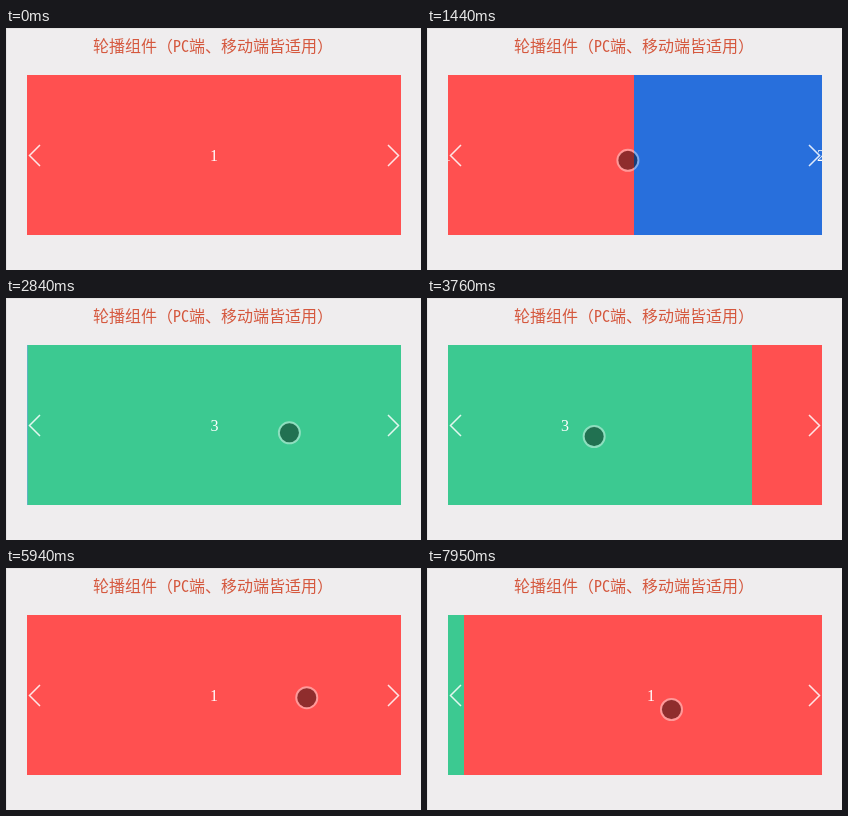
An HTML page for the animation above (8000 ms loop, 415x242 px).

```html
<!DOCTYPE html>
<html lang="zh">
<head>
<meta charset="utf-8">
<title>轮播组件</title>
<style>
  html, body { margin: 0; width: 100%; height: 100%; overflow: hidden; background: #efedee; }
  svg { display: block; width: 100%; height: 100%; }
  .title { font: 300 16px "Noto Sans Mono CJK SC", "Noto Sans CJK SC", "Noto Sans CJK", monospace; fill: #d5583e; }
  .digit { font: 16px "Liberation Serif", serif; fill: #fff; text-anchor: middle; }
  .arrow { fill: none; stroke: #fff; stroke-opacity: .85; stroke-width: 1.5; }
</style>
</head>
<body>
<svg viewBox="0 0 415 242">
  <defs><clipPath id="view"><rect x="21" y="47" width="374" height="160"/></clipPath></defs>
  <rect width="415" height="242" fill="#efedee"/>
  <path d="M0 .5H415M.5 0V242" stroke="#e5e3e4"/>
  <text class="title" x="87" y="24">轮播组件（PC<tspan x="183">端、移动端皆适用）</tspan></text>
  <g clip-path="url(#view)" id="slides"></g>
  <path class="arrow" d="M34 117L23.5 127.5L34 138M382 117L392.5 127.5L382 138"/>
  <g id="touch">
    <circle r="9.7" fill="#000" fill-opacity=".44"/>
    <circle r="10.5" fill="none" stroke="#fff" stroke-opacity=".42" stroke-width="2"/>
  </g>
</svg>
<script>
const LOOP = 8000, APPEAR = 70, WIDTH = 374, SETTLE = 300, SLOP = 6;
const COLORS = ['#ff5050', '#286fdc', '#3cc991'];

// The pointer arrives at `from` (curving towards `via`), is pressed at `down`,
// drags to `to` until `stop`, lets go at `up` and turns `turn` pages.
// Without `to` it only pauses there. It moves on at `leave`.
const gestures = [
  { arrive: 0, leave: APPEAR, from: [352, 226] },
  { arrive: 350, leave: 450, from: [385, 103] },
  { arrive: 900, down: 1060, up: 1520, from: [388.5, 134], to: [162, 132], via: [345, 118], turn: 1 },
  { arrive: 1900, down: 1910, up: 2560, from: [253.5, 131.5], to: [143, 131.5], turn: 1 },
  { arrive: 3380, down: 3530, up: 3860, from: [237.5, 138.5], to: [137, 138.5], via: [430, 137], turn: 1 },
  { arrive: 4380, down: 4640, stop: 5080, up: 5330, leave: 5560, from: [312, 128], to: [295, 127], via: [122, 141] },
  { arrive: 5790, down: 5860, stop: 6100, up: 6350, leave: 6570, from: [306, 128.5], to: [290.5, 132] },
  { arrive: 7190, leave: 7340, from: [400.5, 134.5] },
  { arrive: 7800, down: 7800, stop: 7950, up: LOOP, from: [228.5, 141], to: [244.5, 141.5], via: [120, 146] }
];

const clamp = p => Math.min(1, Math.max(0, p));
const mix = (a, b, p) => a + (b - a) * p;
const mixPoint = (a, b, p) => a.map((v, i) => mix(v, b[i], p));
const bezier = (a, b, u) => 3 * a * u * (1 - u) ** 2 + 3 * b * u * u * (1 - u) + u ** 3;

// CSS "ease"
function ease(p) {
  let lo = 0, hi = 1;
  for (let i = 0; i < 20; i++) {
    const mid = (lo + hi) / 2;
    if (bezier(.25, .25, mid) < p) lo = mid; else hi = mid;
  }
  return bezier(.1, 1, hi);
}

function dragPoint(g, t) {
  if (!g.to) return g.from;
  const stop = g.stop ?? g.up;
  return mixPoint(g.from, g.to, clamp((t - g.down) / (stop - g.down)));
}

function pointerAt(t) {
  const i = gestures.findLastIndex(g => t >= g.arrive);
  const g = gestures[i], next = gestures[i + 1];
  const leave = g.leave ?? g.up;
  if (!next || t < leave) return dragPoint(g, t);
  const p = (t - leave) / (next.arrive - leave);
  const start = g.to ?? g.from;
  if (!next.via) return mixPoint(start, next.from, p);
  return mixPoint(mixPoint(start, next.via, p), mixPoint(next.via, next.from, p), p);
}

function scrollAt(t) {
  let scroll = 0;
  for (const g of gestures) {
    if (!g.to || t < g.down) continue;
    const moved = g.from[0] - dragPoint(g, t)[0];
    const drag = Math.abs(moved) < SLOP ? 0 : Math.round(moved);
    const target = WIDTH * (g.turn ?? 0);
    scroll += mix(drag, target, ease(clamp((t - g.up) / SETTLE)));
  }
  return scroll;
}

const touch = document.getElementById('touch');
const slideBox = document.getElementById('slides');
slideBox.innerHTML = COLORS.map((color, i) =>
  `<g><rect x="21" y="47" width="${WIDTH}" height="160" fill="${color}"/>` +
  `<text class="digit" x="208" y="133">${i + 1}</text></g>`).join('');
const slides = [...slideBox.children];

function draw(t) {
  const total = WIDTH * slides.length;
  const scroll = scrollAt(t);
  slides.forEach((slide, i) => {
    const x = ((i + 1) * WIDTH - scroll + 2 * total) % total - WIDTH;
    slide.setAttribute('transform', `translate(${x.toFixed(2)} 0)`);
  });
  touch.setAttribute('transform', `translate(${pointerAt(t)})`);
  touch.setAttribute('visibility', t < APPEAR ? 'hidden' : 'visible');
}

const begin = performance.now();
function tick() {
  draw((performance.now() - begin) % LOOP);
  requestAnimationFrame(tick);
}
tick();
</script>
</body>
</html>
```
